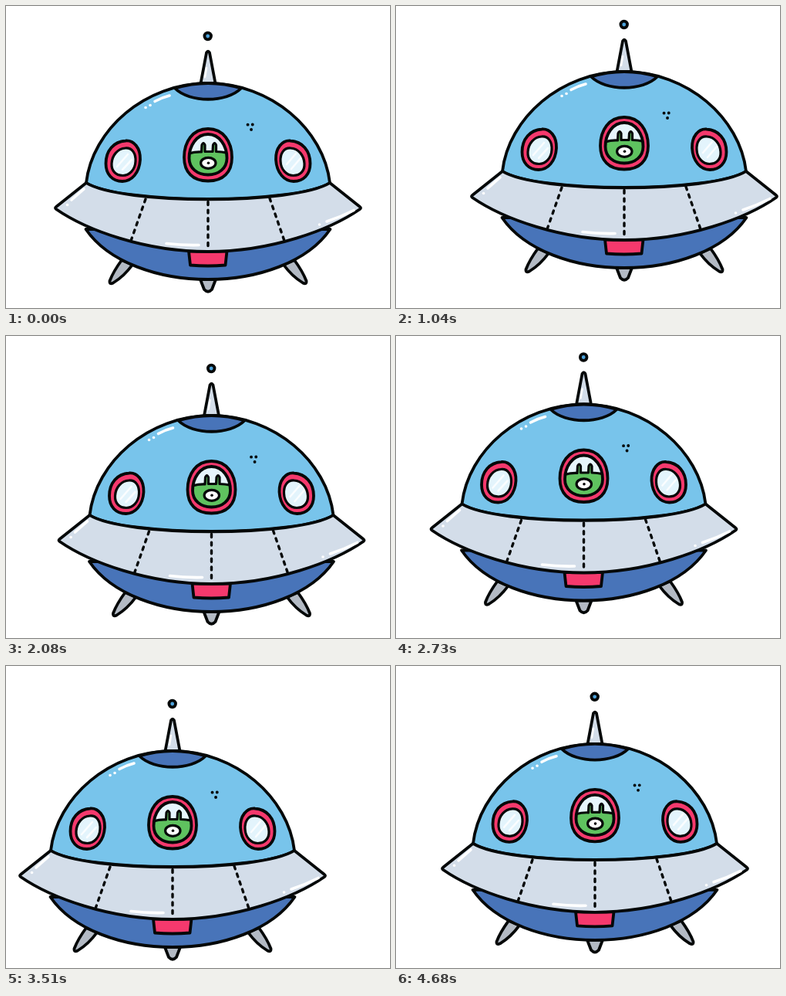
These frames come from a looping animation (498x391 px, 4.81 s). An HTML page:

```html
<!DOCTYPE html>
<html lang="en">
<head>
<meta charset="utf-8">
<title>Hovering saucer</title>
<style>
  html, body { margin: 0; width: 100%; height: 100%; overflow: hidden; background: #fff; }
  svg { display: block; width: 100vw; height: 100vh; }
  .ink { stroke: #050808; stroke-width: 3.8; stroke-linejoin: round; stroke-linecap: round; }
  .thin { stroke-width: 3.2; }
  .shine { stroke: #fff; stroke-width: 3.6; stroke-linecap: round; fill: none; }
  .glint { stroke-width: 2.6; opacity: .8; }
  .seam { stroke: #050808; stroke-width: 3.4; stroke-linecap: round; stroke-dasharray: 4 6.6; }
</style>
</head>
<body>
<svg viewBox="0 0 498 391">
  <defs>
    <path id="frame" d="M262 166C277 166 286.500 181 286.500 197C286.500 210 276 218.500 262 218.500S237.500 210 237.500 197C237.500 181 247 166 262 166Z"/>
    <clipPath id="pane"><use href="#frame"/></clipPath>
    <g id="leg"><path class="ink" fill="#b3bac4" d="M150 329Q139 344 134.500 356Q134 361 139 358.500Q153 350 164 335Z"/></g>
    <g id="port">
      <path class="ink" fill="#f5396d" d="M155 174.500C166 173.500 174.500 184 174 199C173 216 163 227 151 227C138 227 129.500 218 129.500 204C129.500 187 140 175.500 155 174.500Z"/>
      <path class="ink thin" fill="#e3f4fc" d="M155 184C164 183.500 168.500 191 168 201C167.500 212 160 219.500 151.500 219.500C142 219.500 136.500 213 137 204C137.500 193 145 184.500 155 184Z"/>
    </g>
  </defs>
  <g id="ship">
    <use href="#leg"/>
    <use href="#leg" transform="translate(524 0) scale(-1 1)"/>
    <path class="ink" fill="#b3bac4" d="M252 354L257 367Q262 372.500 267 367L272 354Z"/>
    <path class="ink" fill="#4874b9" d="M103.500 289C133 332 198 354 262 354S391 332 420.500 289Z"/>
    <path class="ink" fill="#f5396d" d="M237 317.500H286.500L284.500 335.500Q262 337.500 239 335.500Z"/>

    <path class="ink" fill="#d3dde9" d="M252.500 100L260 60.500Q262 57 264 60.500L271.500 100Z"/>
    <path class="shine" style="stroke-width:2.500" d="M260 80L258 92"/>
    <circle class="ink" cx="261.700" cy="39" r="4.300" fill="#4da3dc"/>

    <path class="ink" fill="#78c4eb" d="M104 229C112 160 180 100 262 100S412 160 420 229C374 257 150 257 104 229Z"/>
    <path class="ink" fill="#4874b9" d="M219 106.500Q262 93.500 305 106.500C286 125.500 238 125.500 219 106.500Z"/>
    <path class="ink" fill="#d3dde9" d="M104 229L65 260Q63 261.500 65 263C104 290 180 318 262 318S420 290 459 263Q461 261.500 459 260L420 229C374 257.500 150 257.500 104 229Z"/>
    <path class="seam" d="M181 250L162 304M262 253.500V315.500M342 249L361 304"/>

    <path class="shine" d="M193 123.500Q202 118.500 212 116M181 131.500h.1M187 128.500h.1M85 251L101 237M79.500 257.500h.1M416 279Q434 273 451 264.500M406.500 283h.1M208 307.500Q228 310 250 309.500"/>
    <path class="ink" d="M313.500 153.700h.1M319.700 153.500h.1M318 160h.1"/>

    <use href="#port"/>
    <path class="shine glint" d="M144 208L158 192M151 212L163 199"/>
    <use href="#port" transform="translate(524 0) scale(-1 1)"/>
    <path class="shine glint" d="M364 205L376 191M370 211L382 197"/>

    <path class="ink" fill="#f5396d" d="M262 159C282 159 293 176 293 196C293 215 282 226.500 262 226.500S231 215 231 196C231 176 242 159 262 159Z"/>
    <g clip-path="url(#pane)">
      <path fill="#e6f5fc" d="M230 160h64v70h-64z"/>
      <path class="ink thin" fill="#5fc25f" d="M234 192Q244 188.500 253.500 189L254 180Q256 175 258 180V188.500H268L268.500 180Q270.500 175 272.500 180V188.500Q281 188.500 290 191V226H234Z"/>
    </g>
    <use href="#frame" class="ink" fill="none"/>
    <ellipse class="ink thin" cx="262.300" cy="203.300" rx="9.700" ry="7" fill="#fff"/>
    <circle cx="262.500" cy="203.300" r="1.800"/>
  </g>
</svg>
<script>
const STEP = 130, COUNT = 37;
// Drift path: step, x, y
const path = [
  [0, 0, 0], [4, 16, -17.5], [5, 20, -19], [8, 34, -15], [10, 36, -8], [12, 29, 1],
  [14, 18, 6], [16, 4.5, 3], [20, -12, -9], [21, -18.5, -11.5], [23, -35, -13.5],
  [25, -47, -5], [27, -46, 10], [30, -32, 20], [33, -17, 14], [35, -8, 5], [36, -4, 0.8]
];
const ship = document.getElementById('ship');

// Path point by index, wrapped around the loop
function point(i) {
  const n = path.length, turn = Math.floor(i / n);
  const [s, x, y] = path[i - turn * n];
  return [s + turn * COUNT, x, y];
}

function slope(i, axis) {
  const a = point(i - 1), b = point(i + 1);
  return (b[axis] - a[axis]) / (b[0] - a[0]);
}

function drift(step, axis) {
  let i = 0;
  while (point(i + 1)[0] <= step) i++;
  const a = point(i), b = point(i + 1), span = b[0] - a[0];
  const u = (step - a[0]) / span, v = 1 - u;
  return v * v * (1 + 2 * u) * a[axis] + u * u * (1 + 2 * v) * b[axis]
    + u * v * span * (v * slope(i, axis) - u * slope(i + 1, axis));
}

function draw(time) {
  const step = Math.floor(time / STEP) % COUNT;
  ship.setAttribute('transform', `translate(${drift(step, 1)} ${drift(step, 2)})`);
}

const start = performance.now();
function tick() {
  draw(performance.now() - start);
  requestAnimationFrame(tick);
}
tick();
</script>
</body>
</html>
```
